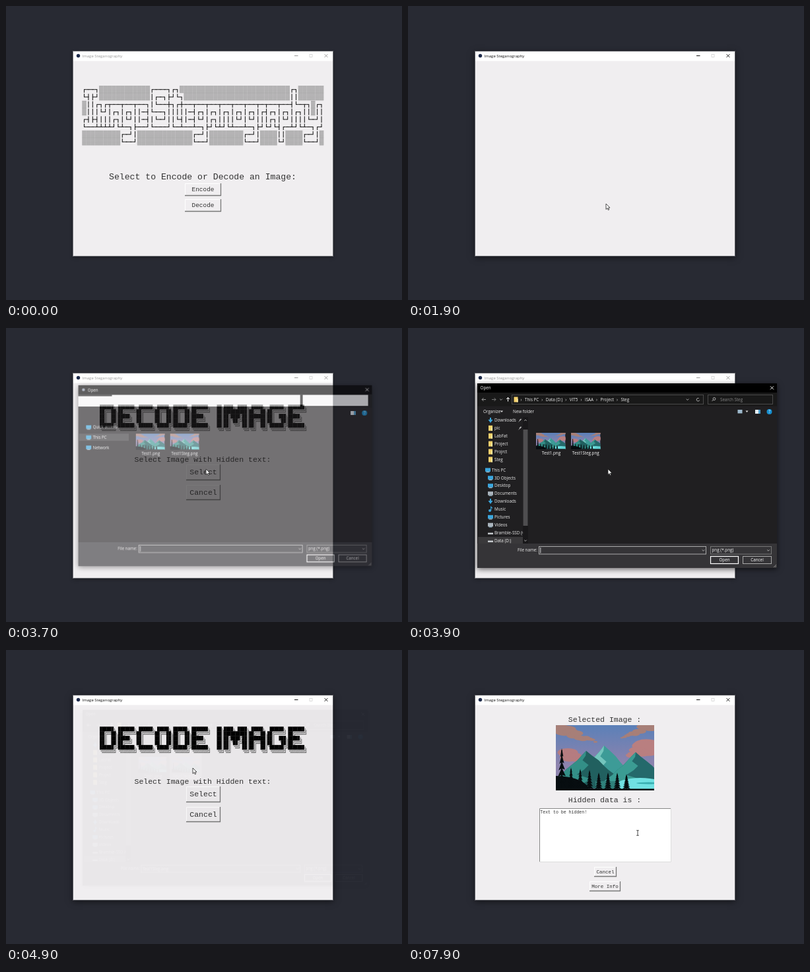
An HTML page with a canvas that plays this animation: 600 by 446 pixels, repeating every 8 s.

```html
<!DOCTYPE html>
<html lang="en">
<head>
<meta charset="utf-8">
<title>Image Steganography</title>
<style>
html, body { margin: 0; width: 100%; height: 100%; overflow: hidden; background: #282a33; }
canvas { display: block; width: 600px; height: 446px; }
</style>
</head>
<body>
<canvas id="stage" width="600" height="446"></canvas>
<script>
const screenCtx = document.getElementById('stage').getContext('2d');
const layer = document.createElement('canvas');
layer.width = 600;
layer.height = 446;
const layerCtx = layer.getContext('2d');
let ctx = screenCtx;

const LOOP = 8000;
const MONO = '"Courier New", "Liberation Mono", monospace';
const SANS = '"Open Sans", "Noto Sans", sans-serif';
const FACE = '#f0eef0', INK = '#333', FOLDER = '#f3d06c', BLUE = '#3aa6dd';

function rect(x, y, w, h, color) {
  ctx.fillStyle = color;
  ctx.fillRect(x, y, w, h);
}
function frame(x, y, w, h, color, width = 1) {
  ctx.strokeStyle = color;
  ctx.lineWidth = width;
  ctx.strokeRect(x + .5, y + .5, w - 1, h - 1);
}
function trace(points) {
  ctx.beginPath();
  for (let i = 0; i < points.length; i += 2) ctx.lineTo(points[i], points[i + 1]);
}
function line(color, width, ...points) {
  ctx.strokeStyle = color;
  ctx.lineWidth = width;
  trace(points);
  ctx.stroke();
}
function poly(color, ...points) {
  ctx.fillStyle = color;
  trace(points);
  ctx.fill();
}
function ring(x, y, r, from = 0, to = 7) {
  ctx.strokeStyle = '#bbb';
  ctx.lineWidth = .9;
  ctx.beginPath();
  ctx.arc(x, y, r, from, to);
  ctx.stroke();
}
function dot(x, y, rx, color, ry = rx) {
  ctx.fillStyle = color;
  ctx.beginPath();
  ctx.ellipse(x, y, rx, ry, 0, 0, 7);
  ctx.fill();
}
function text(s, x, y, size, color, font = SANS, align = 'left') {
  ctx.font = `${size}px ${font}`;
  ctx.fillStyle = color;
  ctx.textAlign = align;
  ctx.fillText(s, x, y);
}
const label = (s, x, y, color = '#eee', align) => text(s, x, y, 6.3, color, SANS, align);
const mono = (s, y, size) => text(s, 298, y, size, INK, MONO, 'center');
const noise = n => Math.abs(Math.sin(n * 91.7) * 4375.5) % 1;
function clipped(x, y, w, h, paint) {
  ctx.save();
  ctx.beginPath();
  ctx.rect(x, y, w, h);
  ctx.clip();
  paint();
  ctx.restore();
}

// Box-drawing banner: bits of each glyph's arms are 1 up, 2 right, 4 down, 8 left.
const ARMS = { '─': 10, '│': 5, '┌': 6, '┐': 12, '└': 3, '┘': 9, '├': 7, '┤': 13, '┬': 14, '┴': 11, '┼': 15 };
const shade = n => '░'.repeat(n);
const tails = (hook, stem) => shade(9) + hook + shade(13) + hook + shade(8) + hook + shade(4) + stem + shade(4) + hook + '░';
const TITLE = [
  '┌──┐' + shade(12) + '┌───┐┌┐' + shade(26) + '┌┐' + shade(6),
  '└┤├┘' + shade(12) + '│┌─┐├┘└┐' + shade(25) + '││' + shade(6),
  '░││┌┐┌┬──┬──┬──┐│└──┼┐┌┼──┬──┬──┬──┬──┬──┬─┬──┬──┤└─┬┐░┌┐',
  '░│││└┘│┌┐│┌┐││─┤└──┐│││││─┤┌┐│┌┐│┌┐│┌┐│┌┐│┌┤┌┐│┌┐│┌┐││░││',
  '┌┤├┤│││┌┐│└┘││─┤│└─┘││└┤│─┤└┘│┌┐││││└┘│└┘│││┌┐│└┘││││└─┘│',
  '└──┴┴┴┴┘└┴─┐├──┘└───┘└─┴──┴─┐├┘└┴┘└┴──┴─┐├┘└┘└┤┌─┴┘└┴─┐┌┘',
  tails('┌─┘│', '││'),
  tails('└──┘', '└┘')
];

function drawTitle() {
  const cw = 6.42, ch = 11.35;
  TITLE.forEach((row, r) => [...row].forEach((c, i) => {
    const x = 115.3 + i * cw, y = 121 + r * ch, cx = x + cw / 2, cy = y + ch / 2;
    if (c === '░') {
      rect(x, y, cw + .1, ch, '#c2c1c2');
      for (let k = 0; k < 5; k++) rect(x, Math.round(y) + k * 2.27, cw + .1, 1, '#a2a1a2');
      return;
    }
    const arms = ARMS[c];
    if (arms & 1) line('#222', 1.1, cx, y + .8, cx, cy);
    if (arms & 4) line('#222', 1.1, cx, cy, cx, y + ch - .8);
    if (arms & 2) line('#222', 1.1, cx - .5, cy, x + cw, cy);
    if (arms & 8) line('#222', 1.1, x, cy, cx + .5, cy);
  }));
}

// Block letters built from bars on a grid five cells high; brackets cut the corners on that side.
const BARS = {
  L: x => x < 2,
  R: (x, y, w) => x >= w - 2,
  r: (x, y, w) => x >= w - 2 && y > 1,
  T: (x, y) => y === 0,
  M: (x, y, w) => y === 2 && x < w - 2,
  m: (x, y, w) => y === 2 && x > w - 4,
  B: (x, y) => y === 4,
  V: (x, y) => y < 4 && Math.abs(Math.abs(x - 4.5) - 2.5 + y) < 1.1,
  '(': () => false,
  ')': () => false
};
const LETTERS = { D: 'LTBR)', E: 'LTMB', C: '(LTB', O: '(LTBR)', I: 'L', M: 'LRV', A: '(LTMR)', G: '(LTBmr)' };
const letterWidth = c => ({ I: 2, M: 10, G: 8, ' ': 2 }[c] || 7);

function blockCells(word) {
  const cells = [];
  let left = 0;
  for (const c of word) {
    const w = letterWidth(c), bars = LETTERS[c] || '';
    for (let y = 0; y < 5; y++) for (let x = 0; x < w; x++) {
      const edgeRow = y === 0 || y === 4 && bars.includes('B');
      const cut = edgeRow && (x === 0 && bars.includes('(') || x === w - 1 && bars.includes(')'));
      if (!cut && [...bars].some(b => BARS[b](x, y, w))) cells.push([left + x, y]);
    }
    left += w + 1;
  }
  return cells;
}
const HEADING = blockCells('DECODE IMAGE');

function drawHeading() {
  const cw = 3.48, ch = 6.95;
  for (let depth = 4; depth >= 0; depth--) {
    const color = depth === 0 ? '#000' : depth % 2 ? FACE : '#666';
    for (const [x, y] of HEADING) {
      rect(142 + x * cw + depth * .8, 116.3 + y * ch + depth * 1.2, cw + .3, ch + .3, color);
    }
  }
}

function button(name, x, y, w, h, size, pressed) {
  rect(x, y, w, h, FACE);
  const [hi, lo] = pressed ? ['#777', '#fff'] : ['#fff', '#777'];
  line(hi, 1, x + .5, y + h - .5, x + .5, y + .5, x + w - .5, y + .5);
  line(lo, 1.3, x, y + h - .5, x + w - .5, y + h - .5, x + w - .5, y);
  const d = pressed ? 1 : 0;
  text(name, x + w / 2 + d, y + h / 2 + size * .28 + d, size, INK, MONO, 'center');
}

function cloud(x, y, dx, dy, size, color) {
  for (let i = 0; i < 12; i++) {
    const u = i / 11, r = size * (1 - u * .8);
    dot(x + dx * u, y + dy * u + (noise(i + x) - .5) * r, r * 1.4, color, r * .6);
  }
}
function mountain(x, top, half, dark, light) {
  const base = 96, steps = 8, body = [x, top], lit = [x, top];
  const edge = (i, side) => [x + side * half * i / steps + noise(i + x) * 3, top + (base - top) * i / steps];
  for (let i = 1; i <= steps; i++) body.push(...edge(i, 1));
  for (let i = steps; i > 0; i--) body.push(...edge(i, -1));
  for (let i = 1; i < steps; i++) lit.push(x - (i % 3 - .6) * i * 2, edge(i, 1)[1]);
  for (let i = steps - 1; i > 0; i--) lit.push(...edge(i, -1));
  poly(dark, ...body);
  poly(light, ...lit);
}
function tree(x, top, width) {
  const steps = 6, step = (97 - top) / steps;
  for (let i = 0; i < steps; i++) {
    const half = width * (.25 + .75 * i / steps) / 2, y = top + i * step;
    poly('#070d10', x, y - 3, x + half, y + step, x, y + step * .8, x - half, y + step * 1.1);
  }
  rect(x - .8, top, 1.6, 97 - top, '#070d10');
}

// Mountain picture, laid out in a 149 x 99 space.
function scene(left, top, w, h) {
  clipped(left, top, w, h, () => {
    ctx.translate(left, top);
    ctx.scale(w / 149, h / 99);
    const sky = ctx.createLinearGradient(0, 0, 0, 60);
    sky.addColorStop(0, '#5b80b8');
    sky.addColorStop(1, '#8d83ad');
    rect(0, 0, 149, 99, sky);
    cloud(8, 8, 52, 17, 11, '#a77f78');
    cloud(144, 0, -44, 20, 9, '#a77f78');
    cloud(140, 32, -30, 14, 15, '#b97f80');
    cloud(18, 47, 24, 4, 11, '#b57c80');
    mountain(73, 31, 62, '#3d9b97', '#74c5bd');
    mountain(46, 39, 64, '#21605f', '#338f87');
    mountain(121, 41, 60, '#24696b', '#3b9c93');
    rect(60, 85, 89, 14, '#2f817b');
    dot(128, 92, 38, '#70e1e2', 12);
    dot(140, 88, 18, '#39aeb0', 1.5);
    dot(0, 99, 50, '#070d10', 22);
    rect(0, 96.5, 149, 3, '#070d10');
    tree(9, 38, 19);
    for (let i = 0; i < 7; i++) tree(23 + i * 14, 67 + i * 1.5 + noise(i) * 4, 14);
  });
}

function windowFrame(active) {
  ctx.save();
  ctx.shadowColor = `rgba(0,0,0,${active ? .5 : .3})`;
  ctx.shadowBlur = active ? 9 : 5;
  ctx.shadowOffsetY = 2;
  rect(101, 68, 395, 312, FACE);
  ctx.restore();
  rect(101, 68, 395, 15.5, '#fff');
  frame(101, 68, 395, 312, active ? '#5c5d63' : '#77787c');
  const ink = active ? '#111' : '#999';
  dot(109.5, 75.5, 2.7, '#1d2a4a');
  text('Image Steganography', 115.5, 78, 6, ink);
  line(ink, 1, 437, 75.5, 442.5, 75.5);
  frame(459.5, 73, 5, 5, '#ccc', .7);
  cross(485, 75.5, ink);
}
function cross(x, y, color) {
  for (const d of [-2.5, 2.5]) line(color, .9, x - 2.5, y - d, x + 2.5, y + d);
}

const pages = {
  menu(t) {
    drawTitle();
    mono('Select to Encode or Decode an Image:', 263, 13.15);
    button('Encode', 271, 269, 55, 19, 9.4);
    button('Decode', 271, 293, 55, 19, 9.4, t >= 1600);
  },
  blank() {},
  decode(t) {
    drawHeading();
    mono('Select Image with Hidden text:', 203, 11.5);
    button('Select', 273, 207, 52, 24, 11.5, t === 3400);
    button('Cancel', 273, 238, 52, 23, 11.5);
  },
  result(t) {
    mono('Selected Image :', 109, 11.5);
    scene(224, 114, 149, 99);
    mono('Hidden data is :', 231, 11.5);
    rect(199, 240, 200, 82, '#fff');
    line('#888', 1, 199.5, 322, 199.5, 240.5, 399, 240.5);
    line('#ddd', 1, 199, 321.5, 398.5, 321.5, 398.5, 240);
    const message = color => text('Text to be hidden!', 200.3, 248, 6.57, color, MONO);
    message(INK);
    if (t >= 6200 && t < 7200) {
      const from = Math.max(200, cursorAt(Math.min(t, 6500))[0]);
      clipped(from, 241, 271.5 - from, 8.5, () => {
        rect(200, 241, 72, 8.5, '#0078d7');
        message('#fff');
      });
    }
    button('Cancel', 282, 329, 34, 15, 7.5);
    button('More Info', 275, 351, 47, 15, 7.5);
  }
};

function icon(x, y, name) {
  if (name === 'Downloads') {
    rect(x - 1, y - 4, 2, 4, BLUE);
    poly(BLUE, x - 3.5, y - 1, x + 3.5, y - 1, x, y + 4);
  } else if (name === 'Music') {
    dot(x - 1, y + 2, 2, BLUE);
    line(BLUE, 1.2, x + .7, y + 2, x + .7, y - 3.5, x + 3, y - 1.5);
  } else if (/pic|Lab|Pro|Steg/.test(name)) {
    rect(x - 3, y - 4, 6, 8, FOLDER);
    rect(x + 1.5, y - 1, 1.5, 5, '#fff1b0');
  } else if (/D:|SSD/.test(name)) {
    rect(x - 4, y, 8, 2.5, '#c4c8cc');
  } else {
    rect(x - 4, y - 3, 8, 5.5, /Doc|Vid/.test(name) ? '#aab4bd' : BLUE);
    rect(x - 2.5, y + 2.5, 5, 1.2, '#a9c7d6');
  }
}
function chevron(x, y, dir = 1) {
  line('#bbb', .9, x - 1.8, y - dir * .9, x, y + dir * .9, x + 1.8, y - dir * .9);
}
const dropArrow = x => poly('#ddd', x - 2, 125.5, x + 2, 125.5, x, 128);

function loadingChrome() {
  dot(113, 91, 2.3, '#8a94a8');
  label('Open', 119.5, 93.5, '#fff');
  rect(105, 99, 343, 18, '#fff');
  rect(105, 98, 52, 3, '#1c1c1c');
  rect(452, 99, 101, 17, '#fff');
  rect(106, 159, 77, 11, '#3a393b');
  ['Quick access', 'This PC', 'Network'].forEach((name, i) => {
    const y = 149 + i * 15.7;
    icon(121, y, name);
    label(name, 127.5, y + 2.2, '#fff');
  });
}

const SIDEBAR = ('Downloads,pic,LabFat,Project,Projrct,Steg,This PC,3D Objects,Desktop,Documents,' +
  'Downloads,Music,Pictures,Videos,Bramble-SSD (C:),Data (D:)').split(',');

function sidebar() {
  clipped(106, 135, 68, 192, () => {
    rect(106, 317, 68, 10, '#3a393b');
    SIDEBAR.forEach((name, i) => {
      const y = 140 + i * 11.9 + (i < 6 ? 0 : 4), indent = i === 6 ? 0 : 4;
      icon(121 + indent, y, name);
      label(name, 127 + indent, y + 2.2);
      if (i > 1) return;
      line('#bbb', 1.6, 169, y + .5, 171.5, y - 2);
      line('#bbb', .7, 167.5, y + 2.5, 170, y);
    });
  });
  rect(174, 135, 8, 192, '#19181a');
  rect(174.5, 154, 7, 146, '#4f4e50');
  chevron(178, 140, -1);
  chevron(178, 322.5);
}

function arrow(x, y, angle, color) {
  ctx.save();
  ctx.translate(x, y);
  ctx.rotate(angle);
  line(color, 1, -3, 0, 3, 0);
  line(color, 1, .5, -2.5, 3, 0, .5, 2.5);
  ctx.restore();
}

function readyChrome() {
  label('Open', 109.5, 93.3, '#fff');
  arrow(115, 108.5, Math.PI, '#999');
  arrow(130, 108.5, 0, '#777');
  arrow(151.5, 108.5, -Math.PI / 2, '#fff');
  chevron(141, 108.5);
  frame(157, 101, 291, 15, '#4a4a4a');
  icon(163.5, 108.5, 'Steg');
  let x = 177;
  for (const name of ['This PC', 'Data (D:)', 'VIT5', 'ISAA', 'Project', 'Steg']) {
    label('›', x - 6.5, 110.5);
    label(name, x, 110.8);
    x += ctx.measureText(name).width + 10.5;
  }
  chevron(423.5, 108.5);
  ring(439.5, 108.7, 2.3, .3, 5.3);
  frame(454, 101, 99, 15, '#4a4a4a');
  ring(464, 107.5, 1.9);
  line('#bbb', .9, 462.5, 109, 460.5, 111);
  label('Search Steg', 473, 110.8, '#888');
  label('Organize', 114, 129.2);
  dropArrow(142);
  label('New folder', 159, 129.2);
  rect(499.5, 124, 7, 5.5, '#9db9cc');
  dropArrow(513.5);
  sidebar();
}

function field(name, x, y, w, h, border, width) {
  rect(x, y, w, h, '#353437');
  frame(x, y, w, h, border, width);
  label(name, x + w / 2, y + 8.3, '#fff', 'center');
}

function dialog(t) {
  const selected = t >= 4600;
  ctx.save();
  ctx.shadowColor = 'rgba(0,0,0,.6)';
  ctx.shadowBlur = 8;
  ctx.shadowOffsetY = 2;
  rect(105, 84, 454, 280, '#201f21');
  ctx.restore();
  rect(105, 84, 454, 14, '#000');
  rect(105, 98, 454, 20.5, '#191919');
  cross(551.5, 90.8, '#fff');

  if (t < 3900) loadingChrome(); else readyChrome();
  rect(526, 124, 8, 6, '#e4edf2');
  rect(531, 124, 3, 6, '#4d9dcc');
  dot(547.5, 127, 4, '#168fd0');
  label('?', 547.5, 129.3, '#fff', 'center');

  if (t >= 4400) rect(244, 138, 51, 57, selected ? '#777678' : '#4a494b');
  ['Test1.png', 'Test1Steg.png'].forEach((name, i) => {
    scene(194 + i * 53, 159, 44.5, 25);
    label(name, 217 + i * 52.3, 192, '#fff', 'center');
  });

  rect(105, 327, 454, 37, '#353437');
  label('File name:', 196, 339.3, '#eee', 'right');
  field('', 198, 331, 254, 12.5, '#aaa');
  if (selected) label('Test1Steg.png', 200.5, 339.6, '#fff');
  else line('#fff', .8, 200.8, 333, 200.8, 341.5);
  chevron(447.5, 337.3);
  field('', 458, 331, 93, 12.5, '#777');
  label('png (*.png)', 460.5, 339.3);
  chevron(546, 337.3);
  field('Open', 458, 346, 43, 12, '#fff', 1.2);
  field('Cancel', 507, 346, 44, 12, '#aaa');
  for (const d of [2, 4]) line('#999', .8, 558 - d, 363, 558, 363 - d);
}

// The dialog is composed on its own layer so that it fades as one sheet.
function fadeDialog(t) {
  if (t < 3600 || t >= 5000) return;
  const opening = Math.min(1, .2 + (t - 3600) / 250);
  const closing = t < 4800 ? 1 : t < 4900 ? .4 : .03;
  const alpha = Math.min(opening, closing), scale = .95 + .05 * alpha;
  ctx = layerCtx;
  ctx.clearRect(0, 0, 600, 446);
  dialog(t);
  ctx = screenCtx;
  ctx.save();
  ctx.globalAlpha = alpha;
  ctx.translate(332, 224);
  ctx.scale(scale, scale);
  ctx.drawImage(layer, -332, -224);
  ctx.restore();
}

// Pointer stops: time, x, y.
const STOPS = [
  [100, 60, 362], [600, 180, 70], [900, 250, 159], [1400, 300, 300], [2400, 300, 300],
  [2700, 176, 190], [3000, 420, 127], [3300, 303, 214], [4200, 303, 214], [4500, 283, 179],
  [6000, 283, 179], [6200, 271, 246], [6500, 201, 249], [6800, 201, 249], [7600, 265, 260], [7900, 348, 277.5]
];
function cursorAt(t) {
  const next = Math.max(1, STOPS.findIndex(stop => stop[0] >= t));
  const [t0, x0, y0] = STOPS[next - 1], [t1, x1, y1] = STOPS[next];
  const u = Math.max(0, (t - t0) / (t1 - t0)), ease = u * u * (3 - 2 * u);
  return [x0 + (x1 - x0) * ease, y0 + (y1 - y0) * ease];
}
function cursor(t) {
  if (t < 100) return;
  const [x, y] = cursorAt(t);
  ctx.save();
  ctx.translate(x, y);
  if (t >= 6200) {
    line(INK, .9, 0, -3.5, 0, 3.5);
    for (const d of [-3.8, 3.8]) line(INK, .9, -1.8, d, 1.8, d);
  } else {
    poly('#fff', 0, 0, 0, 8.5, 2, 6.7, 3.4, 9.6, 4.7, 9, 3.4, 6.2, 6, 6);
    ctx.closePath();
    ctx.strokeStyle = '#222';
    ctx.lineWidth = .8;
    ctx.stroke();
  }
  ctx.restore();
}

function draw(t) {
  rect(0, 0, 600, 446, '#282a33');
  windowFrame(t >= 1600 && t < 3500 || t >= 4800);
  const page = t < 1800 ? 'menu' : t < 2000 ? 'blank' : t < 5400 ? 'decode' : 'result';
  pages[page](t);
  fadeDialog(t);
  cursor(t);
}

const start = performance.now();
function tick() {
  const t = (performance.now() - start) % LOOP;
  draw(Math.floor(t / 100) * 100);
  requestAnimationFrame(tick);
}
tick();
</script>
</body>
</html>
```
